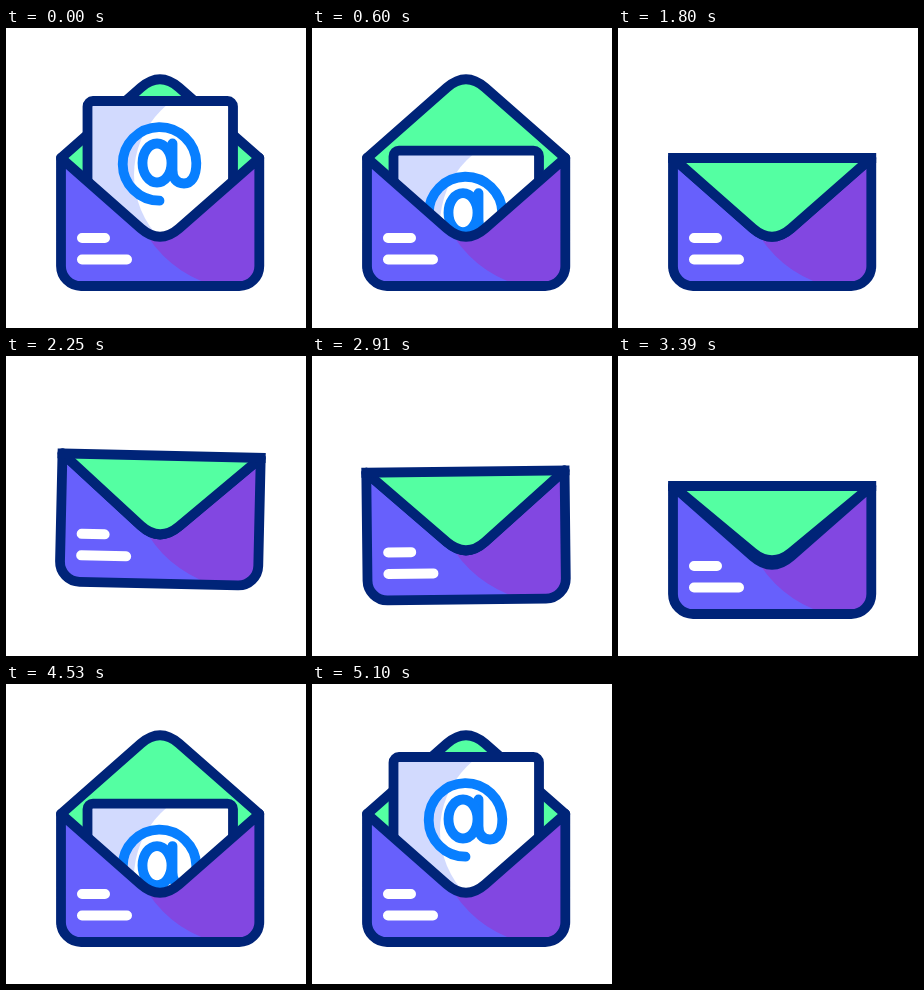
These frames come from a looping animation (300 px wide and 300 px high, 5430 ms). An HTML page:

```html
<!DOCTYPE html>
<html lang="en">
<head>
<meta charset="utf-8">
<title>Envelope</title>
<style>
  html, body { margin: 0; height: 100%; overflow: hidden; background: #fff; }
  svg { display: block; width: 100vw; height: 100vh; }
  .line { stroke: #002478; stroke-width: 9.8; stroke-linejoin: round; stroke-linecap: round; }
</style>
</head>
<body>
<svg viewBox="0 0 300 300">
  <defs>
    <path id="front" d="M55 130L135 200.500Q154 217 173 200.500L253.300 130V238A20 20 0 0 1 233.300 258H75A20 20 0 0 1 55 238Z"/>
    <rect id="sheet" x="81.500" y="73" width="145.500" height="220" rx="5.500"/>
    <clipPath id="inFront"><use href="#front"/></clipPath>
    <clipPath id="inSheet"><use href="#sheet"/></clipPath>
    <clipPath id="pocket"><rect width="300" height="240"/></clipPath>
  </defs>
  <g id="envelope">
    <path fill="#54ffa2" d="M55 129H253.300L173 200.500Q154 217 135 200.500Z"/>
    <path id="openFlap" class="line" fill="#54ffa2"/>
    <g clip-path="url(#pocket)">
      <g id="letter">
        <use href="#sheet" fill="#d2dafe"/>
        <circle cx="219" cy="147" r="91" fill="#fff" clip-path="url(#inSheet)"/>
        <use href="#sheet" class="line" fill="none"/>
        <g fill="none" stroke="#087fff" stroke-width="9.800" stroke-linecap="round" stroke-linejoin="round">
          <path d="M153.500 172.700A36.800 36.800 0 1 1 190.300 135C190.300 149 185 155.500 178 155.500C170 155.500 166.500 150 166.500 142V115.500"/>
          <ellipse cx="151" cy="135" rx="14.500" ry="19.500"/>
        </g>
      </g>
    </g>
    <use href="#front" fill="#6760fc"/>
    <circle cx="240" cy="145" r="117" fill="#8247e1" clip-path="url(#inFront)"/>
    <use href="#front" class="line" fill="none"/>
    <path d="M76 210H99M76 231.500H121" stroke="#fff" stroke-width="10" stroke-linecap="round"/>
    <g id="closedFlap">
      <path id="closedShape" class="line" fill="#54ffa2"/>
      <path class="line" d="M55 130H253.300" style="stroke-linecap: square"/>
    </g>
  </g>
</svg>
<script>
  const STEP = 30, LAST = 5100, LOOP = 5430;
  const [envelope, letter, openFlap, closedFlap, closedShape] =
    ['envelope', 'letter', 'openFlap', 'closedFlap', 'closedShape'].map(id => document.getElementById(id));

  // Eased value through [time, value] keys
  function track(t, keys) {
    if (t <= keys[0][0]) return keys[0][1];
    for (let i = 1; i < keys.length; i++) {
      const [t0, v0] = keys[i - 1], [t1, v1] = keys[i];
      if (t < t1) {
        const x = (t - t0) / (t1 - t0);
        return v0 + (v1 - v0) * x * x * (3 - 2 * x);
      }
    }
    return keys[keys.length - 1][1];
  }

  const slide = [[0, 0], [900, 67], [4200, 67], [5100, 0]];
  const fold = [[900, 1], [1800, -1], [3300, -1], [4200, 1]];
  const lift = [[1800, 0], [2400, -36], [3300, 0]];
  const tilt = [[1800, 0], [2040, 7], [2520, -7], [3000, 0]];

  const flapPath = s =>
    `M55 130L135 ${130 - 70.5 * s}Q154 ${130 - 87 * s} 173 ${130 - 70.5 * s}L253.300 130`;

  function draw(now) {
    const t = Math.min(LAST, Math.floor(now % LOOP / STEP) * STEP);
    const s = track(t, fold);
    envelope.setAttribute('transform', `translate(0 ${track(t, lift)}) rotate(${track(t, tilt)} 154 194)`);
    letter.setAttribute('transform', `translate(0 ${track(t, slide)})`);
    openFlap.setAttribute('d', flapPath(Math.max(s, 0)));
    closedShape.setAttribute('d', flapPath(Math.min(s, 0)));
    closedFlap.style.display = s < 0 ? '' : 'none';
    openFlap.style.display = s < 0 ? 'none' : '';
  }

  const start = performance.now();
  function tick() {
    draw(performance.now() - start);
    requestAnimationFrame(tick);
  }
  tick();
</script>
</body>
</html>
```
